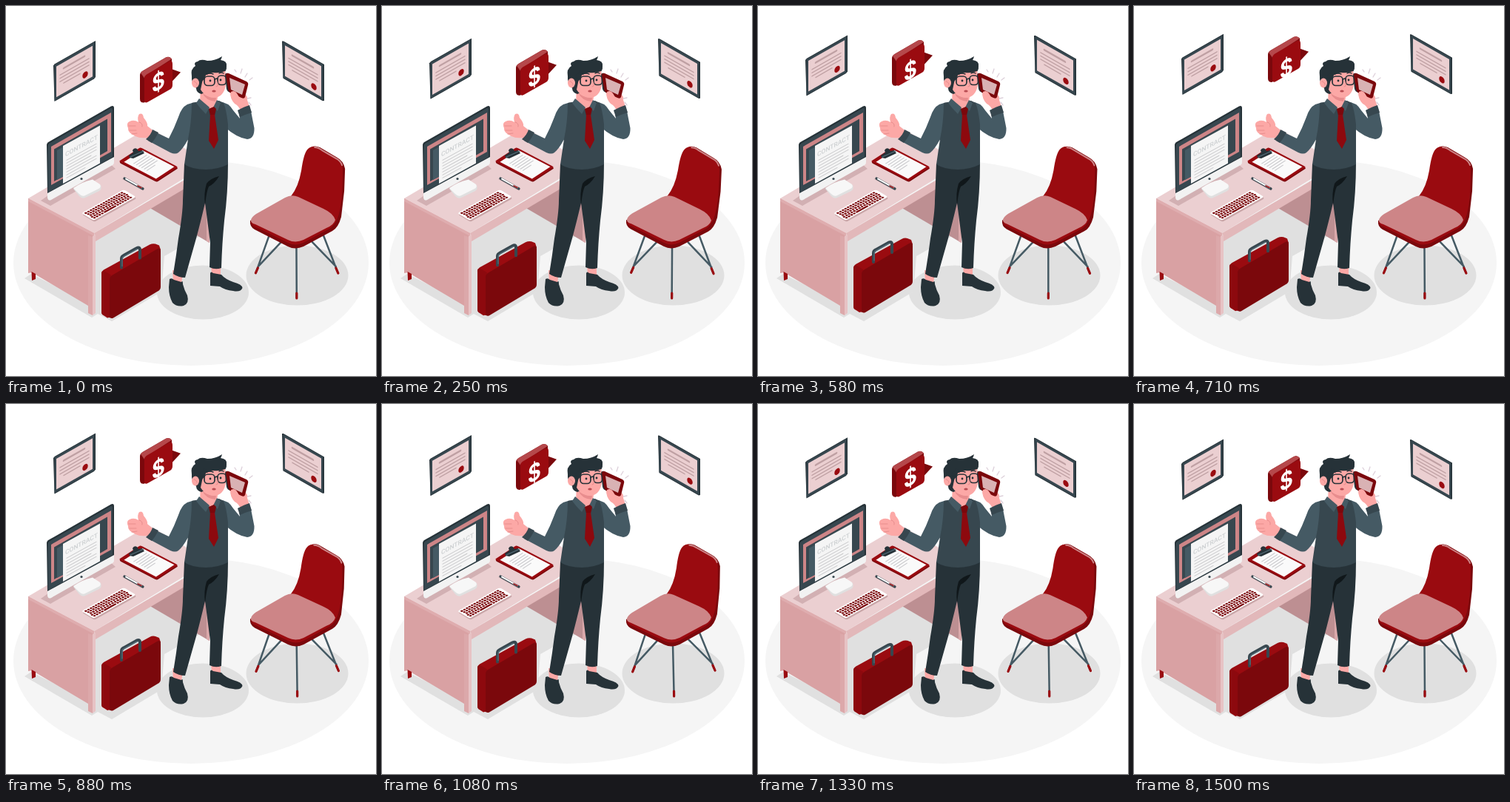
These frames come from a looping animation (500x500 px, 1.54 s). An HTML page:

```html
<!DOCTYPE html>
<html lang="en">
<head>
<meta charset="utf-8">
<title>Office call</title>
<style>
  html, body { margin: 0; width: 100%; height: 100%; overflow: hidden; background: #fff; }
  svg { display: block; width: 100vw; height: 100vh; }
  .slate { fill: #37474f; }
  .steel { fill: #455a64; }
  .ink { fill: #263238; }
  .red { fill: #9a0b10; }
  .wine { fill: #7b080c; }
  .rose { fill: #cd8587; }
  .blush { fill: #ebcfd1; }
  .skin { fill: #fca8a6; }
  .shade { fill: #e0e0e0; }
  .line { fill: none; stroke-linecap: round; stroke-linejoin: round; }
</style>
</head>
<body>
<svg viewBox="0 0 500 500">
  <defs>
    <g id="cert">
      <path class="ink" d="M0 0L2-1H57V48L55 49.500H1.500Z"/>
      <path class="slate" d="M1.500 0H55.500V48.500H1.500Z"/>
      <path class="blush" d="M4 3.500H53V45H4Z"/>
      <g class="line" stroke="#bfa0a3">
        <path stroke-width="2.600" d="M14 11.500H42"/>
        <path stroke-width="1.500" d="M9 18H48M9 22.500H48M9 27H48M14 31.500H36"/>
      </g>
      <ellipse class="red" cx="43" cy="37" rx="3.700" ry="4.200"/>
    </g>
  </defs>

  <ellipse cx="250" cy="347" rx="240" ry="139" fill="#f5f5f5"/>
  <ellipse class="shade" cx="266" cy="387" rx="62" ry="36.500"/>
  <ellipse class="shade" cx="393.500" cy="364" rx="69" ry="40.500"/>
  <path class="shade" d="M25 368L34 362 120 405V310L196 271 262 311 214 338 210 386 143 426 124 416 116 421Z"/>

  <!-- desk -->
  <path d="M186 268L240 238H275V320Z" fill="#bd8f92"/>
  <path d="M271 230H275V320L271 318Z" fill="#dba9ab"/>
  <path class="blush" d="M30 260L193 164 275 212 119 307Z"/>
  <path d="M119 307L275 215V227L121 318Z" fill="#e2b8ba"/>
  <path d="M30 260L119 307V320L111 316V405L35 360 30 361Z" fill="#d9a1a3"/>
  <path class="red" d="M34.500 359L40 362V369L35 371Z"/>
  <path d="M30 260L119 307V311L30 264Z" fill="#dfadaf"/>
  <path d="M111 310L117 312V418L111 415Z" fill="#dca8aa"/>
  <path d="M117 311L121 309V415L117 418Z" fill="#e7c3c5"/>
  <path d="M47 263L57 256 138 211 148 220 60 270Z" fill="#d2b0b3"/>

  <!-- monitor -->
  <path d="M91 247Q104 238 117 235.500L128 242Q130 247 126 250L107 259Q103 261 99 257Z" fill="#e0e0e0"/>
  <path d="M91 246Q104 237 117 234.500L127 241Q129 245 125 247L107 256Q103 258 99 254Z" fill="#f7f7f7"/>
  <path d="M56 251L146 202V211Q146 214 143 215.500L61 262Q57 264 56 259Z" fill="#f2f2f2"/>
  <path class="ink" d="M55 188Q55 185 58 183.500L142 135.500Q146 134 146 138V204L56 253Z"/>
  <path class="slate" d="M56.500 189Q56.500 187 59 185.500L141 138.500Q144 137 144 140V204L56.500 252Z"/>
  <path class="rose" d="M61 190L142 144V197L61 242Z"/>
  <path class="slate" d="M65 193.500L137 152.500V196L65 237Z"/>
  <path class="steel" d="M69 195L77 190.500V231L69 235Z"/>
  <g transform="matrix(1 -.55 0 1 77 189)">
    <path d="M0 0H50V51H0Z" fill="#f5f5f5"/>
    <text x="25" y="16.500" text-anchor="middle" font-family="Roboto, Arial, sans-serif" font-size="8.500" font-weight="500" fill="#cdd0d2">CONTRACT</text>
    <path class="line" stroke="#c8c8ca" stroke-width="1.100" d="M5 22H45M5 26H45M5 30H45M5 34H38M5 38H45M5 42H45M5 46H30"/>
  </g>
  <circle class="slate" cx="102" cy="233.500" r="1.600"/>

  <!-- keyboard -->
  <g transform="matrix(.57 -.32 .55 .33 102 280)">
    <rect width="100" height="30" rx="4" fill="#c9a6a8" transform="translate(-2 4)"/>
    <rect width="100" height="30" rx="4" fill="#fff"/>
    <g id="keys" class="wine"></g>
  </g>

  <!-- clipboard and pen -->
  <path d="M157 234L160 232 187 246 184 249Z" fill="#d2b0b3"/>
  <g transform="matrix(.29 -.19 .51 .265 152.500 210)">
    <rect class="wine" width="100" height="100" rx="5" transform="translate(-4 3)"/>
    <rect class="red" width="100" height="100" rx="5"/>
    <path d="M8 9H93V94H8Z" fill="#fafafa"/>
    <path class="line" stroke="#c9c9cc" stroke-width="2.200" d="M22 27H82M22 34H82M22 41H82M22 48H82M22 55H82M22 62H60"/>
  </g>
  <path class="ink" d="M166 202L172 198 171 195Q173 191 177 193L179 196 184 195 187 199 172 206 167 205Z"/>
  <path class="line" d="M168 204L186 196" stroke="#546e7a" stroke-width="1.300"/>
  <g class="line">
    <path d="M160 233L185 247" stroke="#37474f" stroke-width="3.200"/>
    <path d="M162 233.600L183 245.300" stroke="#fff" stroke-width="2"/>
    <path d="M178 242.800L183 245.500" stroke="#9a0b10" stroke-width="1.500"/>
  </g>

  <use class="float" data-rise="10" href="#cert" data-base="matrix(1 -.57 0 1 64 81)"/>
  <use class="float" data-rise="10" href="#cert" data-base="matrix(1 .57 0 1 373 48)"/>

  <!-- speech bubble -->
  <g class="float" data-rise="30" data-base="translate(0 1)">
    <path class="wine" d="M222 85L236 90 223 104Z"/>
    <path class="wine" d="M181 94Q181 90 185 88L216 70Q221 68 224 72V88L187 131Q181 132 181 126Z"/>
    <path d="M182 91Q183 89 185 88L216 70Q221 68 224 72L190 94Q187 96 187 98Z" fill="#b5484b"/>
    <path class="red" d="M187 99Q187 95 190 93L220 75.500Q225 73 225 79V107Q225 111 222 113L192 130Q187 133 187 127Z"/>
  </g>
  <g class="float" data-rise="20">
    <text transform="matrix(.85 -.46 0 1 206 114.500)" text-anchor="middle" font-family="Inter, Arial, sans-serif" font-size="32" font-weight="700" fill="#fff">$</text>
  </g>

  <!-- briefcase -->
  <g class="float" data-rise="10">
    <path class="red" d="M129 362Q129 359 132 357L194 323Q198 321 202 322L207 324 209 330 144 420 137 422 131 418Q129 417 129 413Z"/>
    <path d="M129 362Q129 359 132 358L142 364 141 422 131 418Q129 417 129 413Z" fill="#8d090e"/>
    <path class="wine" d="M140 371Q140 366 144 364L204 329Q209 326 209 332V380Q209 384 205 386L145 422Q140 424 140 418Z"/>
    <g class="line">
      <path d="M156 354V342Q156 339 159 337.500L176 328Q181 325.500 181 330V341" stroke="#37474f" stroke-width="4"/>
      <path d="M157 352V343Q157 340 160 338.500L177 329" stroke="#546e7a" stroke-width="1.300"/>
    </g>
  </g>

  <!-- chair -->
  <g id="chair">
    <g class="line" stroke="#455a64" stroke-width="2.500">
      <path d="M355 312L338 360M372 319L341 352M392.500 325L393 394M429 310L448.500 360M414 319L446 352"/>
      <path stroke="#9a0b10" stroke-width="3.200" d="M340.500 354L337.500 361M393 388V395M446 354L449 361"/>
    </g>
    <path class="wine" d="M330 290Q329 298 336 302L381 325Q391 330 402 325L441 304Q449 300 453 285L457 250 458 220Q456 209 446 204L424 191Q417 188 412 191L398 262Z"/>
    <path class="red" d="M385 257Q395 245 399 222Q402 200 407 194Q413 187 423 192L445 204Q455 210 455 221Q455 270 448 287Q444 297 437 301L402 320Q391 325 381 320L334 297Q328 292 336 286Z"/>
    <path class="rose" d="M331 289Q332 285 338 281L377 259Q386 254 395 258L429 274Q442 280 445 289Q443 296 433 300L402 316Q391 321 381 316L337 295Q330 293 331 289Z"/>
    <path class="line" d="M417 191Q422 191 427 195L446 206Q452 209 454 215" stroke="#cd8587" stroke-width="2"/>
  </g>

  <!-- feet and legs -->
  <path class="skin" d="M225 357L239 360 237 375 226 373ZM277 350H290V364L278 363Z"/>
  <path class="ink" d="M221 369Q224 367 227 370L237 373Q239 370 239 376 241 384 245 391 248 402 240 405 231 407 225 401 220 392 220 380ZM276 361Q277 358 280 361L291 363Q296 369 307 373 319 376 319.500 381 317 387 307 385 296 384 289 379L276 378Z"/>
  <path class="ink" d="M241 213H300Q300 252 295 290 292 320 291 354 283 357 275 353L276 320 269 266Q263 292 257 314L242 367Q233 367 226 362 230 338 233 314 239 280 239 262Z"/>
  <path d="M288 230Q276 233 271 240 267 253 269 269 271 250 274 244 282 240 288 230Z" fill="#10171a"/>

  <!-- raised arm -->
  <path class="skin" d="M303 117Q306 111 311 116L321 119Q327 120 326 127L329 136 317 142Q315 135 309 132 303 126 303 117Z"/>
  <path class="steel" d="M287 129Q301 130 307 141L316 152 315 146 331 142 335.500 165Q336 179 326 180 312 178 296 164Z"/>
  <path class="slate" d="M313 141Q322 136 329 134L332 144Q325 146 316 150Z"/>

  <!-- torso and pointing arm -->
  <path class="skin" d="M198 183L189 178Q181 179 175 176 164 171 165 165 162 158 167 156 173 153 179 157 177 150 180 146 185 144 186 151 192 158 191 162L201 171Z"/>
  <path class="line" d="M166 162H175M167 168H176M170 173L177 172M180 157Q185 158 184 163" stroke="#e58b8b" stroke-width=".9"/>
  <path class="steel" d="M245 133Q252 130 260 130L262 160 245 182Q239 193 233 198 229 201 222 198L192 182 201 170 220 179Q227 166 233 150 237 137 245 133Z"/>
  <path class="slate" d="M251 131L262 129 288 128 294 131Q298 141 300 160V214Q286 221 270 221 252 221 241 214L246 180Q251 156 251 131Z"/>
  <path class="slate" d="M198 167L206 171Q202 179 197 185L189 180Q196 174 198 167Z"/>
  <path class="skin" d="M263 110L287 117 284 136Q279 141 273 138L262 130Z"/>
  <path d="M265 117Q272 124 284 124L283 129Q270 128 265 117Z" fill="#e88d8e"/>
  <path class="steel" d="M261 125L275 137 270 146Q262 138 257 131ZM285 127L290 131 286 142 280 137Z"/>
  <path class="wine" d="M274 139L281 136 284 139 282 148 276 148Z"/>
  <path d="M276 147H282L287 181 281 193 274 182Z" fill="#8d090e"/>

  <!-- head -->
  <path class="ink" d="M264 119Q257 117 257 111 250 103 251 95 249 85 256 81 253 76 259 75 263 71 272 74 283 74 292 68 291 72 290 73 299 74 298 81 299 90 290 92L270 116Z"/>
  <path class="skin" d="M267 94Q273 92 280 90 289 91 296 88 299 95 297 106 296 115 291 120 284 126 275 123 267 120 263 113Z"/>
  <ellipse class="skin" cx="256" cy="104" rx="5" ry="6.500"/>
  <path class="ink" d="M261 94Q266 92 267 87L271 89Q270 98 264 103Z"/>
  <path class="line" d="M254 102Q257 102 258 106" stroke="#e58b8b"/>
  <g class="line" stroke="#263238" stroke-width="1.700">
    <rect x="268" y="95" width="14" height="12.500" rx="4.500"/>
    <rect x="286" y="94" width="11.500" height="12.500" rx="4.500"/>
    <path d="M261 97L268 98.500M282 99.500Q284 97.500 286 98.500"/>
    <path stroke-width="1.400" d="M271 92.500Q275 90 280 92M288 91Q291 89 294 91"/>
  </g>
  <circle class="ink" cx="276" cy="101" r="1.400"/>
  <circle class="ink" cx="290" cy="100" r="1.400"/>
  <path class="line" d="M285 102Q288 108 284 109" stroke="#e58b8b" stroke-width="1.100"/>
  <ellipse cx="281" cy="115" rx="2.700" ry="1.500" fill="#b94d53"/>

  <!-- phone -->
  <path class="ink" d="M296 94Q296 90 300 91L302 92 303 117Q299 116 298 112Z"/>
  <path class="wine" d="M297 93Q298 89.500 302 91.500L325 102Q328 104 327 107L323 123Q322 126 318 124L303 117Q300 115 300 112Z"/>
  <path d="M302 97L323 106 319 120 304 113Z" fill="#d9b2b4"/>
  <path class="skin" d="M304 116Q309 113 312 118L315 123Q314 131 309 131 303 126 304 116Z"/>
  <path class="line" d="M311 89L309 86M317 91L319 85M323 96L326 91M329 100L333 97M326 125L331 124M328 130L331 134" stroke="#ddd0da" stroke-width="1.300"/>
</svg>
<script>
  const FRAMES = 37, LOOP = 1540, STEP = LOOP / FRAMES;
  const keys = document.getElementById('keys');
  const chair = document.getElementById('chair');
  const floats = document.querySelectorAll('.float');

  function addKey(x, y, w) {
    const key = document.createElementNS('http://www.w3.org/2000/svg', 'rect');
    const box = { x, y, width: w, height: 4, rx: .6 };
    for (const name in box) key.setAttribute(name, box[name]);
    keys.append(key);
  }

  // Staggered rows of keys; the front row holds the space bar.
  for (let row = 0; row < 5; row++) {
    const y = 2.8 + row * 5.1;
    for (let col = 0; col < 15; col++) {
      if (row === 4 && col > 3 && col < 9) continue;
      addKey(3.5 + col * 6.1 + row % 3, y, 4.4);
    }
    if (row === 4) addKey(29, y, 28.5);
  }

  // Linear rise and fall, and a linear swing either side of upright.
  const rise = p => 1 - Math.abs(1 - 2 * p);
  const swing = p => p < .25 ? 4 * p : p < .75 ? 2 - 4 * p : 4 * p - 4;

  function draw(now) {
    const frame = Math.floor((now % LOOP + 5) / STEP);
    const p = (frame + 1) % FRAMES / FRAMES;
    for (const el of floats) {
      const { rise: height, base = '' } = el.dataset;
      el.setAttribute('transform', `translate(0 ${-height * rise(p)}) ${base}`);
    }
    chair.setAttribute('transform', `rotate(${swing(p)} 393.5 293)`);
  }

  const start = performance.now();
  function tick() {
    draw(performance.now() - start);
    requestAnimationFrame(tick);
  }
  tick();
</script>
</body>
</html>
```
